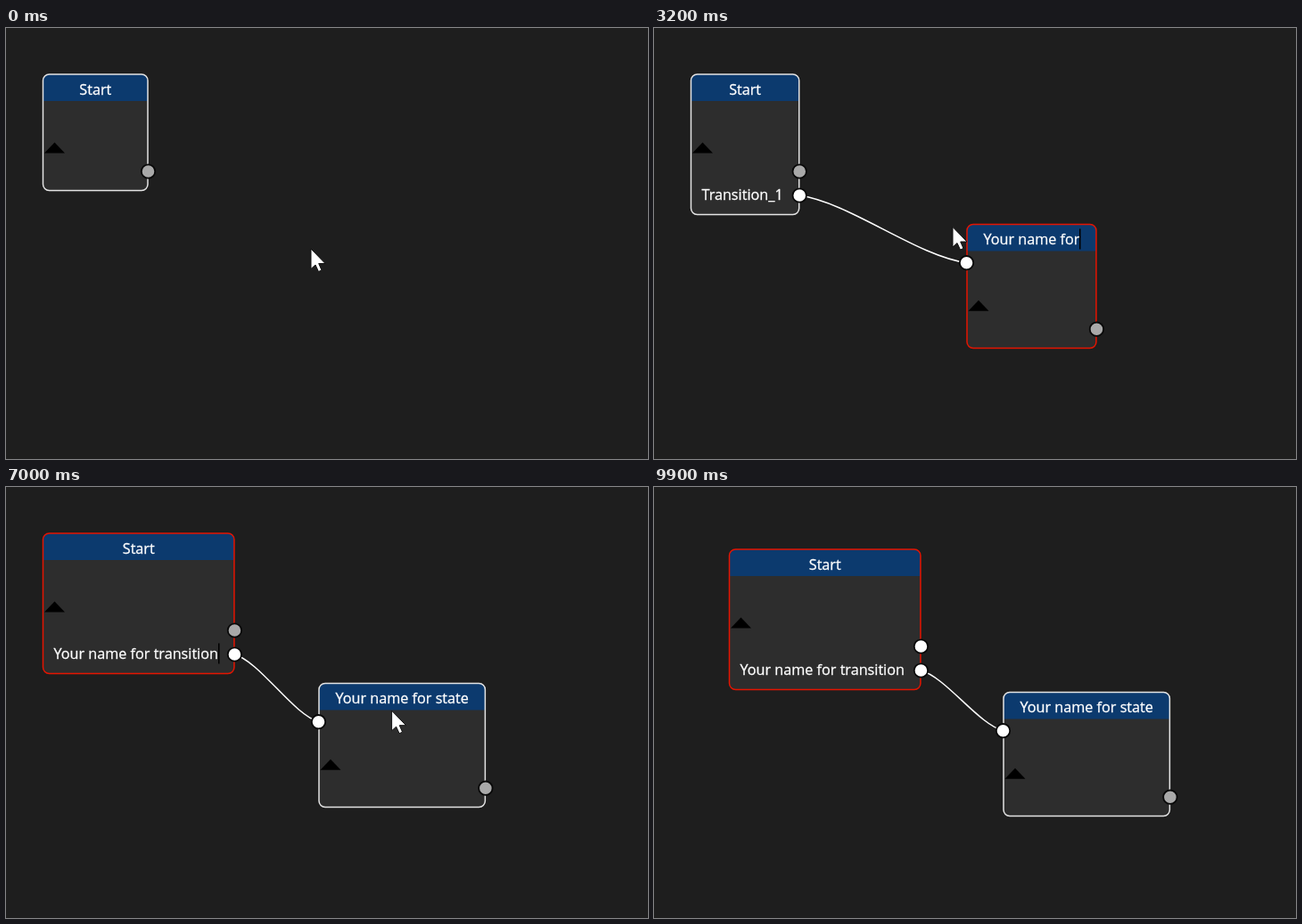
These frames come from a looping animation (720x484 px, 10 s). An HTML page with a canvas:

```html
<!DOCTYPE html>
<html lang="en">
<head>
<meta charset="utf-8">
<title>State editor</title>
<style>
html, body { margin: 0; width: 100%; height: 100%; overflow: hidden; background: #1e1e1e; }
canvas { display: block; }
</style>
</head>
<body>
<canvas id="stage" width="720" height="484"></canvas>
<script>
const ctx = document.getElementById('stage').getContext('2d');
const LOOP = 10000, STEP = 100, GLIDE = 500, MIN_WIDTH = 117.5;
const RED = '#e51400', WHITE = '#fff', GRAY = '#a9a9a9', BODY = '#2d2d2d';

const plus = ([x, y], dx, dy) => [x + dx, y + dy];
const mix = (a, b, f) => a.map((v, i) => v + (b[i] - v) * f);
const progress = (t, from, to) => Math.min(1, Math.max(0, (t - from) / (to - from)));
const within = (t, from, to) => t >= from && t < to;
const typed = (text, t, from, to) => text.slice(0, Math.floor(text.length * progress(t, from, to)));

// Resting places of the two nodes, and the points the pointer visits on them.
const startHome = [41.5, 52], startEnd = plus(startHome, 43, 18);
const stateHome = [358, 258], stateMid = [351, 220.5], stateEnd = plus(stateMid, 41, 10);
const grab = node => plus(node, 38, 16);
const startToggle = plus(startHome, 13, 81), emptySpot = [690, 300];

// Each visit: time of arrival and place.
const visits = [
  [0, [342, 248]], [700, plus(startHome, 117, 108)], [1300, plus(stateHome, -15, 32)],
  [1600, grab(stateHome)], [2000, grab(stateMid)], [2400, plus(stateMid, -16, 3)],
  [4000, emptySpot], [4400, plus(startHome, 100, 142)], [4900, plus(startHome, 6, 150)],
  [5100, plus(startHome, 5, 126)], [7200, emptySpot], [7500, grab(stateMid)], [7700, grab(stateEnd)],
  [7900, startToggle], [8200, plus(stateEnd, 17, 97)], [9000, startToggle],
  [9200, grab(startHome)], [9600, grab(startEnd)], [9800, [372, 384]]
];
const clicks = [
  [0, 'none'], [1600, 'state'], [4000, 'none'], [4300, 'start'], [7300, 'none'],
  [7500, 'state'], [7900, 'start'], [8200, 'state'], [9000, 'start']
];
const selectedAt = t => clicks.findLast(c => c[0] <= t)[1];

function cursorAt(t) {
  const i = visits.findIndex(v => v[0] > t);
  if (i < 0) return visits.at(-1)[1];
  const [left, from] = visits[i - 1], [arrival, to] = visits[i];
  return mix(from, to, progress(t, Math.max(left, arrival - GLIDE), arrival));
}

const textWidth = s => ctx.measureText(s).width;

function label(s, x, y, color = WHITE) {
  ctx.fillStyle = ctx.strokeStyle = color;
  ctx.lineWidth = 0.3;
  ctx.fillText(s, x, y);
  ctx.strokeText(s, x, y);
}

function selection(s, x, baseline) {
  ctx.fillStyle = BODY;
  ctx.fillRect(x, baseline - 18, textWidth(s), 23);
  ctx.fillStyle = '#174a7c';
  ctx.fillRect(x, baseline - 18, textWidth(s) + 1, 23);
  label(s, x, baseline, '#a9cbe8');
}

function caret(x, baseline) {
  ctx.fillStyle = '#000';
  ctx.fillRect(Math.round(x), baseline - 17.5, 1.5, 23);
}

function dot(x, y, color) {
  ctx.beginPath();
  ctx.arc(x, y, 7.7, 0, 7);
  ctx.fillStyle = color;
  ctx.fill();
  ctx.strokeStyle = '#080808';
  ctx.lineWidth = 1.8;
  ctx.stroke();
}

function wire(x1, y1, x2, y2, dashed) {
  const dx = (x2 - x1) * 0.3, dy = (y2 - y1) * 0.1;
  ctx.beginPath();
  ctx.moveTo(x1, y1);
  ctx.bezierCurveTo(x1 + dx, y1 + dy, x2 - dx, y2 - dy, x2, y2);
  ctx.setLineDash(dashed ? [9, 3] : []);
  ctx.strokeStyle = WHITE;
  ctx.lineWidth = 1.5;
  ctx.stroke();
  ctx.setLineDash([]);
}

function toggle(x, y, down, hover) {
  const h = down ? -6 : 6;
  ctx.beginPath();
  ctx.moveTo(x - 11.5, y + h);
  ctx.lineTo(x, y - h);
  ctx.lineTo(x + 11.5, y + h);
  ctx.closePath();
  ctx.fillStyle = hover ? BODY : '#000';
  ctx.fill();
  if (!hover) return;
  ctx.strokeStyle = WHITE;
  ctx.lineWidth = 1.3;
  ctx.stroke();
}

function nodeBody(n) {
  ctx.beginPath();
  ctx.roundRect(n.x, n.y, n.w, n.h, 7);
  ctx.fillStyle = BODY;
  ctx.fill();
  ctx.save();
  ctx.clip();
  ctx.fillStyle = '#0c3a6e';
  ctx.fillRect(n.x, n.y, n.w, 30);
  ctx.restore();
  ctx.strokeStyle = n.selected ? RED : '#e4e4e4';
  ctx.lineWidth = 1.5;
  ctx.stroke();

  const tx = n.x + (n.w - textWidth(n.title)) / 2, ty = Math.round(n.y + 22.7);
  (n.titleSelected ? selection : label)(n.title, tx, ty);
  if (n.titleCaret) caret(tx + textWidth(n.title), ty);

  if (n.collapsed) {
    label('Output', n.right - 18.5 - textWidth('Output'), n.out + 5.5);
    toggle(n.x + 15.5, n.out + 20, true, n.hover);
  } else {
    toggle(n.x + 13, n.out - 26.5, false, n.hover);
  }
}

function drawCursor([x, y], kind) {
  ctx.save();
  ctx.translate(x, y);
  if (kind === 'text') {
    ctx.strokeStyle = WHITE;
    ctx.lineWidth = 2;
    ctx.stroke(new Path2D('M-6-11H6M-6 11H6M0-11V11'));
  } else {
    ctx.lineWidth = 1;
    if (kind === 'link') {
      ctx.setLineDash([2, 1]);
      ctx.strokeStyle = '#bbb';
      ctx.strokeRect(2.5, 23.5, 17, 11);
      ctx.setLineDash([]);
      ctx.fillStyle = WHITE;
      ctx.fillRect(15, 30, 14, 14);
      ctx.fillStyle = '#000';
      ctx.fill(new Path2D('M18 32h9v9l-3-3q-3 1-2 5q-6-4-1-8z'));
    }
    const arrow = new Path2D('M0 0V22.5L5 18L8.5 25.5L12 24L8.7 16.5H16Z');
    ctx.fillStyle = WHITE;
    ctx.fill(arrow);
    ctx.strokeStyle = '#111';
    ctx.stroke(arrow);
  }
  ctx.restore();
}

function draw(t) {
  ctx.fillStyle = '#1e1e1e';
  ctx.fillRect(0, 0, 720, 484);
  ctx.font = '16.2px "Open Sans", "Noto Sans", sans-serif';

  const cursor = cursorAt(t), selected = selectedAt(t);
  const linked = t >= 1500;
  const linking = within(t, 800, 1500) || within(t, 9800, 9900);

  // Start node
  const [sx, sy] = mix(startHome, startEnd, progress(t, 9200, 9600));
  const folded = within(t, 7900, 9000);
  const hasRow = linked && !folded;
  const transition = t < 5100 ? 'Transition_1' : typed('Your name for transition', t, 5000, 6900);
  const start = {
    title: 'Start', x: sx, y: sy, collapsed: folded,
    w: hasRow ? Math.max(MIN_WIDTH, textWidth(transition) + 30) : MIN_WIDTH,
    h: folded ? 96 : hasRow ? 157.5 : 130.5,
    out: sy + (folded ? 62 : 109),
    selected: selected === 'start',
    hover: within(t, 7900, 8100) || within(t, 9000, 9100)
  };
  start.right = start.x + start.w;
  const rowY = start.y + 136;
  nodeBody(start);

  if (hasRow) {
    const end = start.right - 18, x = end - textWidth(transition), y = Math.round(rowY + 5);
    label(transition, x, y);
    if (within(t, 4500, 5100)) {
      const from = Math.round(transition.length * (1 - progress(t, 4460, 4750)));
      selection(transition.slice(from), x + textWidth(transition.slice(0, from)), y);
    }
    if (within(t, 5100, 7200)) caret(end, y);
  }

  // Second node
  const hasState = t >= 300, collapsed = within(t, 8300, 8800);
  const [nx, ny] = t < 7500
    ? mix(stateHome, stateMid, progress(t, 1600, 2000))
    : mix(stateMid, stateEnd, progress(t, 7500, 7700));
  const title = t < 2400 ? 'State 1' : typed('Your name for state', t, 2300, 3600);
  const state = {
    title, x: nx, y: ny, collapsed,
    w: Math.max(MIN_WIDTH, textWidth(title) + 37),
    h: collapsed ? 105 : 139,
    out: ny + (collapsed ? 71 : 117.7),
    selected: selected === 'state',
    titleSelected: within(t, 2200, 2400),
    titleCaret: within(t, 2400, 4000),
    hover: within(t, 8200, 8900)
  };
  state.right = state.x + state.w;
  const inY = state.y + 43.2;
  if (hasState) {
    nodeBody(state);
    if (collapsed) label('Input', state.x + 18.5, inY + 5.5);
  }

  // Wires and connectors
  const link = () => wire(start.right, folded ? start.out : rowY, state.x, inY);
  if (hasRow) link();
  if (linking) wire(start.right, start.out, ...plus(cursor, -6, -5), true);

  dot(start.right + 0.5, start.out, linking || t >= 9800 ? WHITE : GRAY);
  if (hasRow) dot(start.right + 0.5, rowY, WHITE);
  if (hasState) {
    dot(state.x - 0.5, inY, linked ? WHITE : GRAY);
    dot(state.right + 0.5, state.out, GRAY);
  }
  if (folded) link();

  if (t < 9900) drawCursor(cursor, linking ? 'link' : within(t, 4400, 5100) ? 'text' : 'arrow');
}

const begin = performance.now();
function tick() {
  const ms = (performance.now() - begin) % LOOP;
  draw(Math.floor(ms / STEP) * STEP);
  requestAnimationFrame(tick);
}
tick();
</script>
</body>
</html>
```
